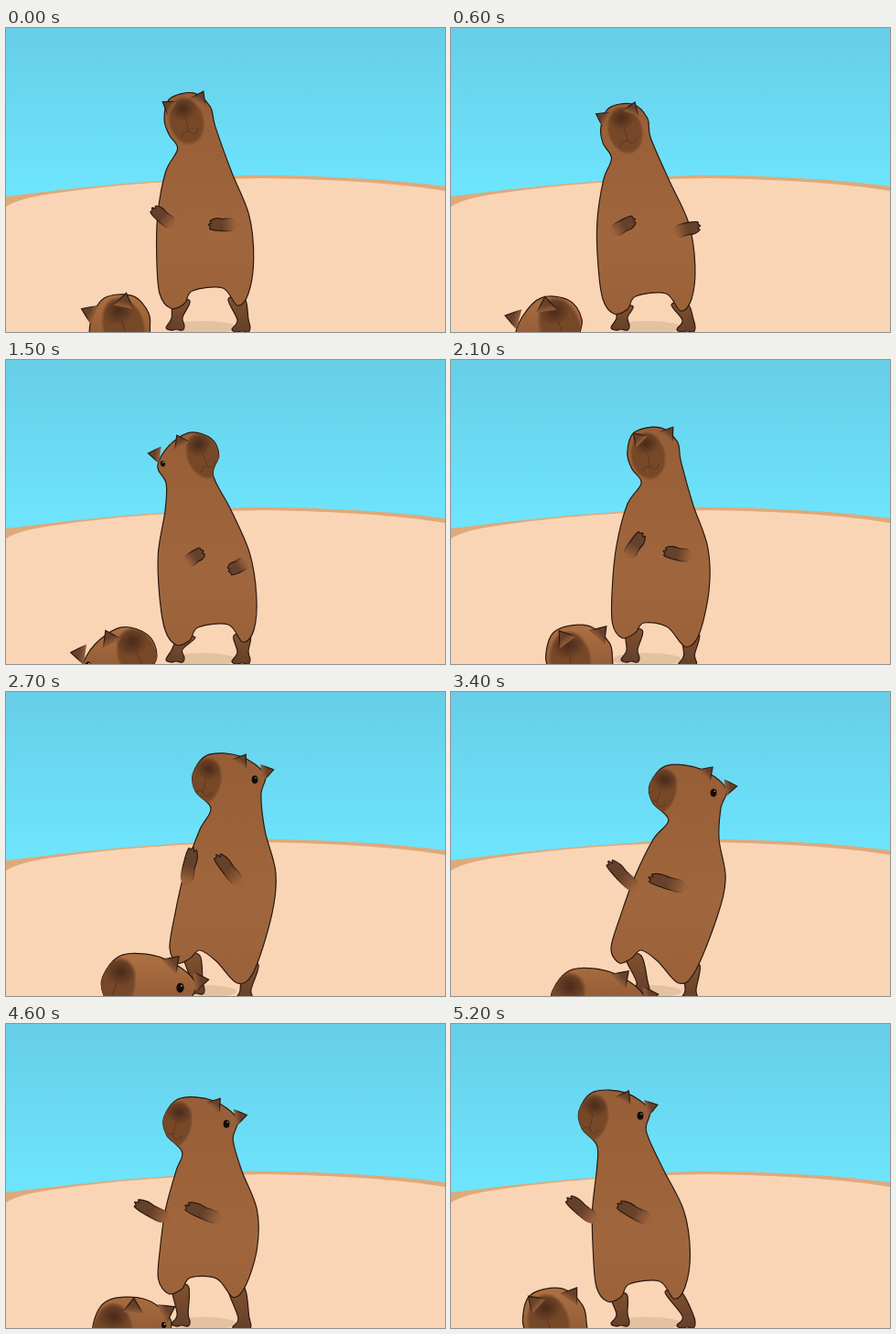
Animation, 480 px wide and 332 px high, one loop 5.3 s. Source, as an HTML page with a canvas:

```html
<!DOCTYPE html>
<html lang="en">
<head>
<meta charset="utf-8">
<title>Dancing capybaras</title>
<style>
html, body { margin: 0; height: 100%; overflow: hidden; }
canvas { display: block; width: 100vw; height: 100vh; }
</style>
</head>
<body>
<canvas id="stage" width="480" height="332"></canvas>
<script>
const ctx = document.getElementById('stage').getContext('2d');
const LOOP = 5300, STEP = 100;
const INK = '#2c190f', FUR = '#9b623a', DARK = '#65402a', SNOUT = '#774828', NOSE = '#4f2e1d';

// turn: -1 faces left, 0 the viewer, 1 right. reach: angle of each forearm. kid: x, y, turn.
const poses = [
  { t: 0,    turn: [0],    head: [200, 100], hip: [217, 290], reach: [3.8, 3.1], kid: [124, 325, .2] },
  { t: 600,  turn: [.1],   head: [190, 111], hip: [215, 296], reach: [5.7, 6],   kid: [107, 327, .4] },
  { t: 1500, turn: [.6],   head: [200, 108], hip: [223, 295], reach: [5.6, 2.6], kid: [125, 327, .6] },
  { t: 2700, turn: [-.85], head: [243, 97],  hip: [228, 280], reach: [4.9, 4],   kid: [155, 323, -1] },
  { t: 3400, turn: [-1],   head: [258, 110], hip: [224, 280], reach: [3.9, 3.4], kid: [160, 339, -1] },
  { t: 4000, turn: [-1],   head: [246, 118], hip: [223, 270], reach: [3.4, 3.4], kid: [162, 344, -1] },
  { t: 5200, turn: [-.8],  head: [178, 102], hip: [208, 287], reach: [3.8, 3.6], kid: [113, 324, -.1] }
];

// Head outlines from the left jaw over the crown to the right side of the neck.
const FRONT = [[-20, 28], [-25, 11], [-26, -7], [-15, -27], [12, -27], [26, -8], [26, 14]];
const LEFT = [[-18, 31], [-37, 13], [-41, -7], [-24, -28], [13, -27], [42, -8], [38, 15]];
const RIGHT = LEFT.map(([x, y]) => [-x, y]).reverse();

const mix = (a, b, k) => a.map((v, i) => v + (b[i] - v) * k);
const clamp = v => Math.min(1, Math.max(0, v));

function poseAt(time) {
  const i = poses.findLastIndex(p => p.t <= time);
  const a = poses[i], b = poses[Math.min(i + 1, poses.length - 1)];
  const u = (time - a.t) / (b.t - a.t || 1), k = u * u * (3 - 2 * u);
  const pose = {};
  for (const part of ['turn', 'head', 'hip', 'reach', 'kid']) pose[part] = mix(a[part], b[part], k);
  return pose;
}

// Closed Catmull-Rom curve through the points.
function smooth(pts) {
  const n = pts.length, at = i => pts[(i + n) % n], path = new Path2D();
  path.moveTo(...pts[0]);
  for (let i = 0; i < n; i++) {
    const [p, a, b, q] = [at(i - 1), at(i), at(i + 1), at(i + 2)];
    path.bezierCurveTo(a[0] + (b[0] - p[0]) / 6, a[1] + (b[1] - p[1]) / 6,
      b[0] - (q[0] - a[0]) / 6, b[1] - (q[1] - a[1]) / 6, ...b);
  }
  path.closePath();
  return path;
}

function paint(path, fill, ink = INK) {
  ctx.fillStyle = fill;
  ctx.fill(path);
  ctx.strokeStyle = ink;
  ctx.lineWidth = 1.2;
  ctx.stroke(path);
}

function gradient([x0, y0], [x1, y1], ...colors) {
  const g = ctx.createLinearGradient(x0, y0, x1, y1);
  colors.forEach((c, i) => g.addColorStop(i / (colors.length - 1), c));
  return g;
}

function softEllipse(x, y, rx, ry, color, core) {
  ctx.save();
  ctx.translate(x, y);
  ctx.scale(rx, ry);
  const g = ctx.createRadialGradient(0, 0, core, 0, 0, 1);
  g.addColorStop(0, color);
  g.addColorStop(1, color + '00');
  ctx.fillStyle = g;
  ctx.fillRect(-1, -1, 2, 2);
  ctx.restore();
}

function makeHead(x, y, turn, scale) {
  const tilt = -.25 - .32 * Math.min(0, turn);
  const c = Math.cos(tilt) * scale, s = Math.sin(tilt) * scale;
  const place = ([px, py]) => [x + px * c - py * s, y + px * s + py * c];
  const outline = FRONT.map((p, i) => place(mix(p, (turn < 0 ? LEFT : RIGHT)[i], Math.abs(turn))));
  return { x, y, turn, tilt, scale, place, outline };
}

function drawEar({ turn, place }, side) {
  const near = side * turn < 0;
  const [x, y] = mix([23 * side, -26], near ? [54 * side, -11] : [-26 * side, -30], Math.abs(turn));
  const d = Math.hypot(x, y), ux = x / d, uy = y / d;
  const corner = w => place([x - ux * 13 - uy * w, y - uy * 13 + ux * w]);
  const tip = place([x, y]), base = place([x - ux * 14, y - uy * 14]);
  const ear = new Path2D();
  ear.moveTo(...corner(9));
  ear.lineTo(...tip);
  ear.lineTo(...corner(-9));
  paint(ear, gradient(tip, base, DARK, DARK, FUR), gradient(tip, base, INK, INK, INK + '00'));
}

function drawFace(head, skin) {
  const { x, y, turn, tilt, scale } = head, side = Math.abs(turn);
  ctx.save();
  ctx.clip(skin);
  ctx.translate(x, y);
  ctx.rotate(tilt);
  ctx.scale(scale, scale);
  ctx.save();
  ctx.translate(29 * turn - 3 * (1 - side), 1);
  ctx.rotate(-.25 * turn);
  softEllipse(0, 0, 20 - 2 * side, 27, SNOUT, .85);
  softEllipse(0, -14, 15, 13, NOSE, .15);
  ctx.strokeStyle = '#52301daa';
  ctx.lineWidth = 1;
  ctx.beginPath();
  ctx.moveTo(0, -4);
  ctx.lineTo(0, 12);
  ctx.moveTo(-10, 16);
  ctx.quadraticCurveTo(-5, 9, 0, 12);
  ctx.quadraticCurveTo(6, 20, 10, 10);
  ctx.stroke();
  ctx.restore();
  const r = 4 * clamp((side - .3) / .4);
  if (r > 0) {
    ctx.translate(-29 * Math.sign(turn), -2);
    ctx.fillStyle = '#120b08';
    ctx.beginPath();
    ctx.ellipse(0, 0, r * .85, r * 1.1, 0, 0, 7);
    ctx.fill();
    ctx.fillStyle = '#d8cec5';
    ctx.fillRect(r * .1, -r * .6, 1.2, 1.2);
  }
  ctx.restore();
}

function drawHeadDetails(head, skin) {
  drawFace(head, skin);
  for (const side of [-1, 1]) drawEar(head, side);
}

function drawArm(elbow, angle, length) {
  const c = Math.cos(angle), s = Math.sin(angle);
  const place = ([a, w]) => [elbow[0] + c * a * length - s * w, elbow[1] + s * a * length + c * w];
  const shape = [[-.1, 0], [.1, 6.5], [.45, 6.5], [.7, 7.5], [.95, 5], [.9, 2.5], [1.02, 1], [.95, -1.5], [.96, -4], [.65, -6], [.1, -6.5]];
  const tip = place([1, 0]);
  paint(smooth(shape.map(place)), gradient(elbow, tip, FUR, DARK, DARK),
    gradient(elbow, tip, INK + '00', INK, INK));
}

function drawLeg([hx, hy], [fx, fy]) {
  paint(smooth([[hx - 9, hy], [fx - 5, fy - 12], [fx - 11, fy - 2], [fx - 6, fy + 1], [fx, fy],
    [fx + 7, fy + 1], [fx + 9, fy - 4], [fx + 7, fy - 13], [hx + 9, hy]]),
    gradient([hx, hy], [fx, fy], '#80502f', DARK));
}

function drawParent({ turn: [turn], head: [x, y], hip: [hx, hy], reach }) {
  const head = makeHead(x, y, turn, 1);
  const lean = clamp((x - 200) / 43);
  const bend = (x + hx) / 2 + 13 - 9 * turn;
  const spine = u => [(1 - u) ** 2 * x + 2 * u * (1 - u) * bend + u * u * hx, y + (hy - y) * u];
  const flank = side => [[.3, 36], [.55, 50], [.8, 53]].map(([u, w]) => {
    const [sx, sy] = spine(u);
    return [sx + side * w, sy];
  });
  const rump = [[48 - 5 * lean, 25 * lean], [36 - 11 * lean, 13 + 25 * lean], [20 - 18 * lean, 20 * lean - 6],
    [-13 - 3 * lean, 5 * lean - 3], [-22 - 5 * lean, 11], [-37 - 3 * lean, 16], [-49, 0]].map(([dx, dy]) => [hx + dx, hy + dy]);
  const skin = smooth([...head.outline, ...flank(1), ...rump, ...flank(-1).reverse()]);

  drawLeg([hx - 25, hy + 8], [186 + 22 * lean, 329]);
  drawLeg([hx + 35 + 4 * lean, hy + 6 + 12 * lean], [258 + 3 * lean, 331 + 7 * lean]);
  paint(skin, gradient([0, 70], [0, 310], '#965e37', FUR, '#a0673f', FUR));
  drawHeadDetails(head, skin);
  const [cx, cy] = spine(.55);
  reach.forEach((angle, i) => {
    const shoulder = (i ? .75 : -.75) + turn * .65;
    drawArm([cx + 50 * Math.sin(shoulder), cy + 10], angle, 28 - 12 * turn);
  });
}

function drawKid([x, y, turn]) {
  const head = makeHead(x, y, turn, 1.22);
  const skin = smooth([...head.outline, [x + 45, 400], [x - 45, 400]]);
  paint(skin, gradient([0, 288], [0, 332], '#ad7041', '#965e37'));
  drawHeadDetails(head, skin);
}

function ground(left, curves, fill) {
  ctx.fillStyle = fill;
  ctx.beginPath();
  ctx.moveTo(0, 332);
  ctx.lineTo(0, left);
  for (const curve of curves) ctx.quadraticCurveTo(...curve);
  ctx.lineTo(480, 332);
  ctx.fill();
}

function drawScene() {
  ctx.fillStyle = gradient([0, 0], [0, 175], '#66cee6', '#6ad9f2', '#6ee4fd');
  ctx.fillRect(0, 0, 480, 332);
  ground(184, [[130, 167, 270, 160.5], [400, 162, 480, 173]], '#dfa97a');
  ground(195, [[14, 186, 50, 181], [150, 166, 280, 164], [410, 166, 480, 178]], '#f9d5b6');
  ctx.fillStyle = '#e3c2a0';
  ctx.beginPath();
  ctx.ellipse(214, 327, 38, 7, 0, 0, 7);
  ctx.fill();
}

const start = performance.now();
function tick() {
  const elapsed = (performance.now() - start) % LOOP;
  const pose = poseAt(Math.floor(elapsed / STEP) * STEP);
  drawScene();
  drawParent(pose);
  drawKid(pose.kid);
  requestAnimationFrame(tick);
}
tick();
</script>
</body>
</html>
```
